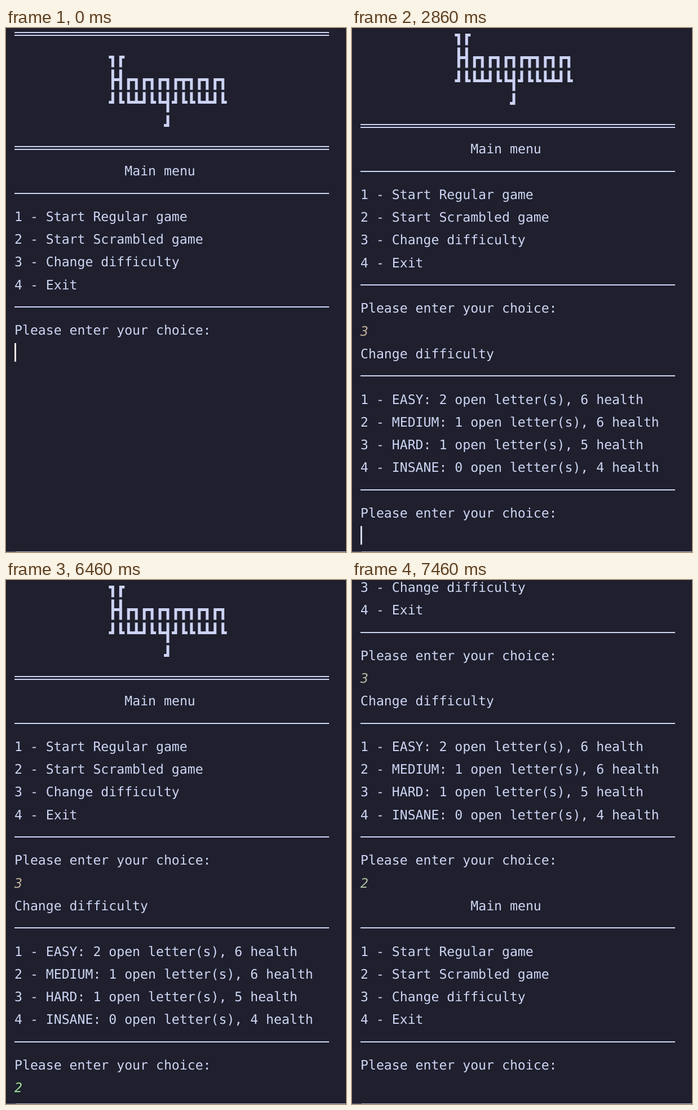
Animation, 603 px wide and 928 px high, one loop 7990 ms. Source, as an HTML page:

```html
<!DOCTYPE html>
<html lang="en">
<head>
<meta charset="utf-8">
<title>Hangman terminal</title>
<style>
  html, body { margin: 0; width: 100%; height: 100%; overflow: hidden; background: #1f1f2d; }
  svg { display: block; width: 603px; height: 928px; }
  text {
    font: 23.17px "DejaVu Sans Mono", "Noto Sans Mono", monospace;
    text-rendering: geometricPrecision;
    white-space: pre;
    fill: #cdd6f4;
  }
  .typed { font-style: italic; }
  .rule { fill: #cdd6f4; }
  .logo { fill: none; stroke: #cbd2f3; stroke-width: 5; }
</style>
</head>
<body>
<svg id="screen" viewBox="0 0 603 928"></svg>
<script>
const LOOP = 7990;
const LEFT = 15, CELL = 13.95, ROW = 40.3, FIRST = 9.95;
const RULE = "-", DOUBLE = "=";
const PROMPT = "Please enter your choice:";
const MENU = [
  " ".repeat(14) + "Main menu", RULE,
  "1 - Start Regular game", "2 - Start Scrambled game",
  "3 - Change difficulty", "4 - Exit", RULE, PROMPT
];
const LEVELS = [
  "Change difficulty", RULE,
  "1 - EASY: 2 open letter(s), 6 health", "2 - MEDIUM: 1 open letter(s), 6 health",
  "3 - HARD: 1 open letter(s), 5 health", "4 - INSANE: 0 open letter(s), 4 health",
  RULE, PROMPT
];
const LOGO = ["┓┏", "┣┫┏┓┏┓┏┓┏┳┓┏┓┏┓", "┛┗┗┻┛┗┗┫┛┗┗┗┻┛┗", "       ┛"];
const LOGO_COLUMN = 12;
const ARMS = { "┓": "LD", "┏": "RD", "┛": "LU", "┗": "RU", "┣": "UDR", "┫": "UDL", "┻": "LRU", "┳": "LRD" };

// Rows 14 and 23 hold the typed answers.
const LINES = [DOUBLE, "", "", "", "", DOUBLE, ...MENU, "", ...LEVELS, "", ...MENU];

// rows: printed rows, scroll: pixels, first and second: colours of the typed answers
const PAGE = {
  menu: { rows: 14, scroll: 0, first: "#a9d894", caret: "#f0e6e4" },
  levels: { rows: 23, scroll: 38.8, first: "#c3b29d", second: "#a2e29c", caret: "#d4d8ea" },
  printing: { rows: 32, scroll: 171.5, first: "#b9ba9c", second: "#bdbf9f" },
  done: { rows: 32, scroll: 401.5, first: "#b2b99f", second: "#abc0a2", caret: "#d4d8ea" }
};
const step = (at, page, cursor, answers = "") => ({ at, ...PAGE[page], cursor, answers });
const STEPS = [
  step(0, "menu", [14, 0]),
  step(530, "menu", null),
  step(990, "menu", [14, 0]),
  step(1520, "menu", null),
  step(2000, "menu", [14, 0]),
  step(2250, "menu", [14, 1], "3"),
  step(2660, "menu", [15, 0], "3"),
  step(2860, "levels", [23, 0], "3"),
  step(3460, "levels", null, "3"),
  step(3990, "levels", [23, 0], "3"),
  step(4450, "levels", null, "3"),
  step(4980, "levels", [23, 0], "3"),
  step(5460, "levels", null, "3"),
  step(5530, "levels", [23, 1], "32"),
  step(6460, "levels", null, "32"),
  step(6660, "printing", null, "32"),
  step(6730, "done", [32, 0], "32"),
  step(7460, "done", null, "32")
];

const rect = (x, y, w, h, attrs) => `<rect x="${x}" y="${y}" width="${w}" height="${h}" ${attrs}/>`;
const rule = y => rect(LEFT, y, 558, 2, 'class="rule"');
const label = (text, y, attrs = "") => {
  const body = text.trimStart();
  const x = LEFT + (text.length - body.length) * CELL;
  return `<text x="${x}" y="${Math.floor(y + 9.8)}" ${attrs}>${body}</text>`;
};

function logoPath(rowY) {
  let d = "";
  LOGO.forEach((line, row) => [...line].forEach((char, column) => {
    const x = LEFT + (LOGO_COLUMN + column + 0.5) * CELL;
    const y = Math.floor(rowY(row + 1)) + 1.5;
    for (const arm of ARMS[char] || "") {
      if (arm === "L") d += `M${x + 2.5} ${y}H${x - CELL / 2}`;
      if (arm === "R") d += `M${x - 2.5} ${y}H${x + CELL / 2}`;
      if (arm === "U") d += `M${x} ${y + 2.5}V${y - 18}`;
      if (arm === "D") d += `M${x} ${y - 2.5}V${y + 18}`;
    }
  }));
  return `<path class="logo" d="${d}"/>`;
}

function draw({ rows, scroll, cursor, answers, first, second, caret }) {
  const rowY = row => FIRST + row * ROW - scroll;
  let out = logoPath(rowY);
  LINES.slice(0, rows).forEach((line, row) => {
    const y = rowY(row);
    if (line === RULE) out += rule(Math.floor(y));
    else if (line === DOUBLE) out += rule(Math.floor(y - 2.4)) + rule(Math.floor(y + 2.6));
    else if (line) out += label(line, y);
  });
  [...answers].forEach((digit, i) => {
    out += label(digit, rowY(i ? 23 : 14), `class="typed" style="fill:${i ? second : first}"`);
  });
  if (cursor) {
    const [row, column] = cursor;
    out += rect(LEFT + column * 13, Math.floor(rowY(row) - 15.9), 3, 33, `fill="${caret}"`);
  }
  out += rect(0, 927, 17, 1, 'fill="#6a6874"') + rect(17, 927, 586, 1, 'fill="#c4c1ca"');
  document.getElementById("screen").innerHTML = out;
}

let shown = null;
function tick() {
  const time = performance.now() % LOOP;
  const current = STEPS.findLast(s => s.at <= time);
  if (current !== shown) draw(shown = current);
  requestAnimationFrame(tick);
}
tick();
</script>
</body>
</html>
```
